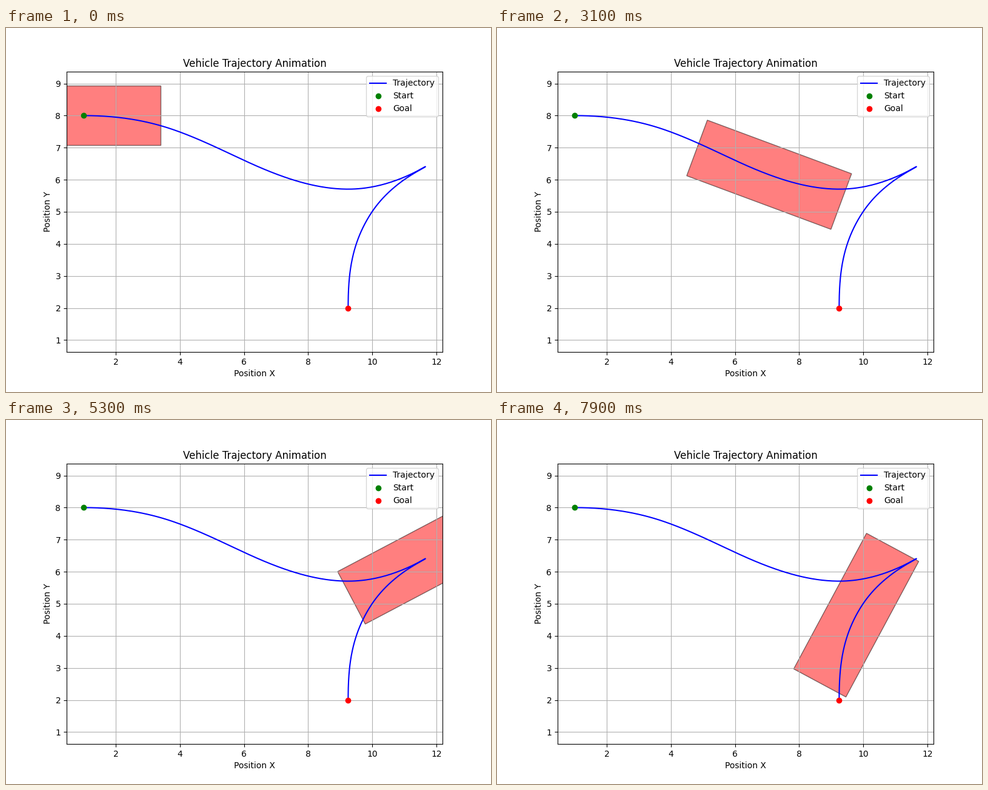
Write a matplotlib script that moves like this. It is 800 px wide and 600 px high and loops after 8 s.

```python
import numpy as np
import matplotlib.pyplot as plt
from matplotlib.animation import FuncAnimation
from matplotlib.patches import Polygon

LENGTH, WIDTH = 4.8, 1.85
T_CUSP = 5.75                  # seconds until the car reverses

# Waypoints: x, y, heading in degrees
START, CUSP, GOAL = (1, 8, 0), (11.66, 6.408, 29.6), (9.25, 2, 90)
FORWARD = np.array([START, (3.741, 7.58, -18.6), (5.982, 6.615, -25),
                    (9.25, 5.707, 0), CUSP])
REVERSE = np.array([GOAL, (9.782, 4.647, 61.75),
                    (10.946, 5.965, 36.1), CUSP])


def hermite(p, knots, values, slopes):
    """Cubic through the knots; returns value and slope at p."""
    i = np.clip(np.searchsorted(knots, p) - 1, 0, len(knots) - 2)
    h = knots[i + 1] - knots[i]
    w = (p - knots[i]) / h
    a, b, m, n = values[i], values[i + 1], slopes[i], slopes[i + 1]
    value = (a + (b - a) * w * w * (3 - 2 * w)
             + h * w * (1 - w) * (m * (1 - w) - n * w))
    slope = (6 * w * (1 - w) * (b - a) / h
             + m * (1 - w) * (1 - 3 * w) + n * w * (3 * w - 2))
    return value, slope


def forward(x):
    kx, ky, deg = FORWARD.T
    y, slope = hermite(x, kx, ky, np.tan(np.radians(deg)))
    return x, y, np.arctan(slope)


def reverse(y):
    kx, ky, deg = REVERSE.T
    x, slope = hermite(y, ky, kx, np.tan(np.radians(90 - deg)))
    return x, y, np.pi / 2 - np.arctan(slope)


def pose(t):
    if t <= T_CUSP:
        w = t / T_CUSP
        z = 1 - w
        ease = w * w * (1 + 2 * z + 1.42 * z ** 4.75)   # brisk smoothstep
        return forward(START[0] + (CUSP[0] - START[0]) * ease)
    tau = t - T_CUSP
    return reverse(CUSP[1] - tau ** 2 * (.295 + .04 * tau))


def corners(t):
    x, y, a = pose(t)
    ahead = np.array([np.cos(a), np.sin(a)]) * LENGTH / 2
    side = np.array([-np.sin(a), np.cos(a)]) * WIDTH / 2
    return np.array([x, y]) + [ahead + side, ahead - side,
                               -ahead - side, -ahead + side]


fig, ax = plt.subplots(figsize=(8, 6), dpi=100)
x1, y1, _ = forward(np.linspace(START[0], CUSP[0], 200))
x2, y2, _ = reverse(np.linspace(CUSP[1], GOAL[1], 150))
ax.plot(np.r_[x1, x2], np.r_[y1, y2], 'b-', label='Trajectory')
ax.plot(*START[:2], 'go', label='Start')
ax.plot(*GOAL[:2], 'ro', label='Goal')
car = ax.add_patch(Polygon(corners(0), closed=True, facecolor='red',
                           edgecolor='black', alpha=0.5))

# 5 % margins in x, equal scale in y
span = CUSP[0] - START[0]
half = 0.55 * span * 462 / 620
ax.set_xlim(START[0] - 0.05 * span, CUSP[0] + 0.05 * span)
ax.set_ylim(5 - half, 5 + half)
ax.set_xlabel('Position X')
ax.set_ylabel('Position Y')
ax.set_title('Vehicle Trajectory Animation')
ax.grid(True)
ax.legend(loc='upper right')


def update(k):
    car.set_xy(corners(k / 10))
    return car,


anim = FuncAnimation(fig, update, frames=80, interval=100,
                     repeat=True, repeat_delay=0)
plt.show()
```
